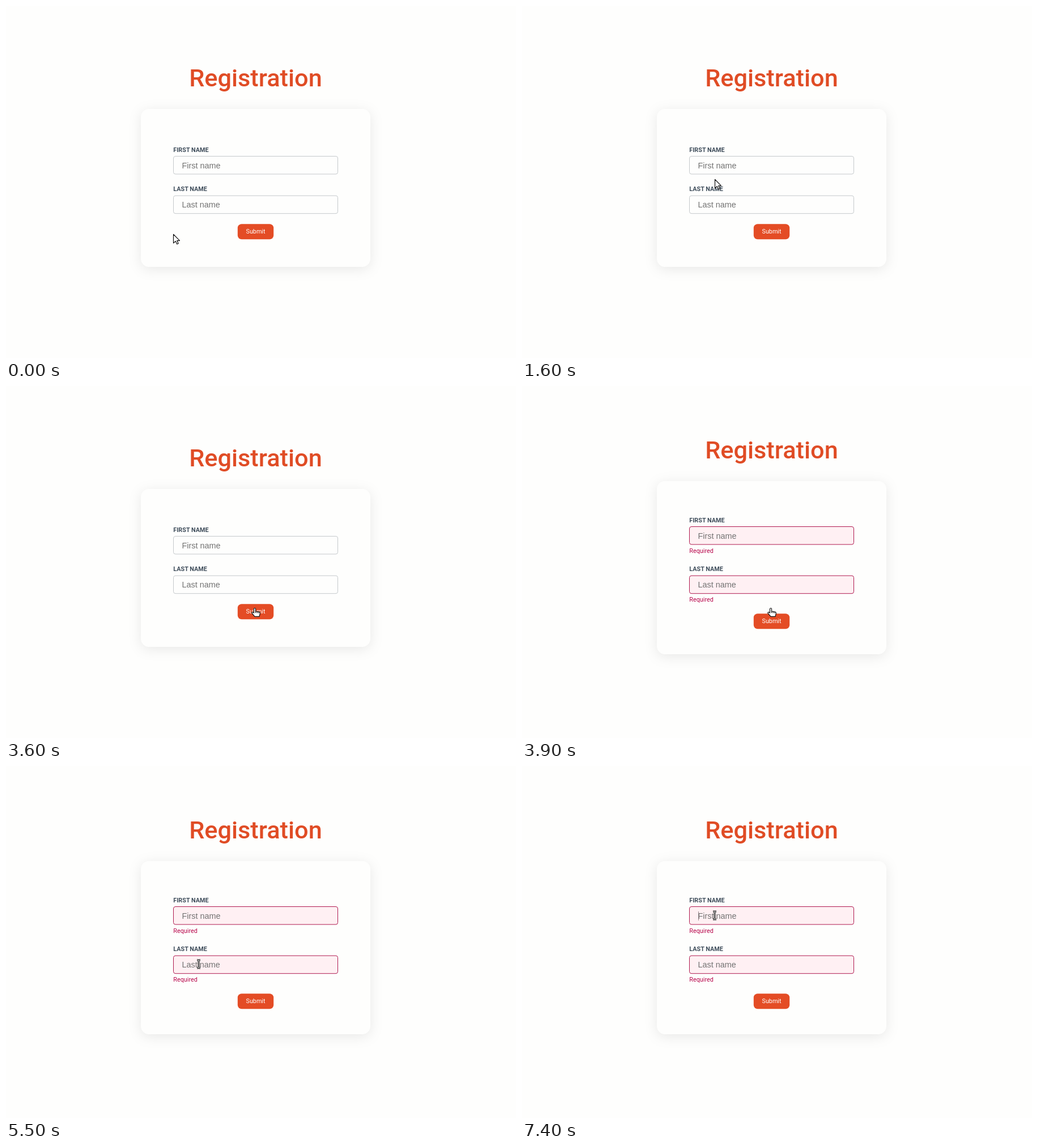
Animation of 900 by 622 pixels, one loop 8000 ms. Source, as an HTML page:

```html
<!DOCTYPE html>
<html lang="en">
<head>
<meta charset="utf-8">
<title>Registration form</title>
<style>
html, body { margin: 0; width: 100%; height: 100%; overflow: hidden; background: #fefefd; }
svg { display: block; }
text { font: 10.8px Roboto, sans-serif; }
.title { font-size: 43.2px; font-weight: 500; fill: #e04c25; text-anchor: middle; }
.card { fill: #fefefd; filter: drop-shadow(0 4px 11px rgba(0, 0, 0, .085)); }
.label { font-weight: 700; fill: #3f4d5b; }
.box { fill: #fefefd; stroke: #c5c9cc; }
.hint { font: 14.4px "Liberation Sans", Arial, sans-serif; fill: #727272; }
.required { fill: #b8054a; visibility: hidden; }
.button { fill: #e44c25; }
.caption { fill: #fff; text-anchor: middle; }
.error .box { fill: #fff0f3; stroke: #b0194f; }
.error .required { visibility: visible; }
.error .title { transform: translateY(-14px); }
.error #first { transform: translateY(-17px); }
.error #submit { transform: translateY(17px); }
#caret { fill: #99898d; }
#cursor path { stroke: #111; stroke-width: 1.2; fill: #fff; stroke-linejoin: round; }
#cursor #beam path { fill: none; stroke: inherit; stroke-width: inherit; }
#beam { stroke: #111; stroke-width: 3; }
#beam use { stroke: #ddd; stroke-width: 1; }
</style>
</head>
<body>
<svg id="stage" width="900" height="622">
  <rect id="card" class="card" x="238" width="405" rx="14.4"/>
  <text class="title" x="440.5" y="142">Registration</text>
  <g id="first"></g>
  <g id="last"></g>
  <rect id="caret" x="311" y="257" width="1" height="16"/>
  <g id="submit">
    <rect class="button" x="408.8" y="385.2" width="63.4" height="27" rx="7"/>
    <text class="caption" x="440.5" y="402">Submit</text>
  </g>
  <g id="cursor">
    <path id="arrow" d="M.5 .5V16L4.2 12.6 6.7 17.8 9.2 16.7 6.8 11.6H11.5Z"/>
    <g id="hand">
      <path d="M-1.5 8V1Q-1.5-.5 0-.5T1.5 1V5L7.5 6Q9.7 6.5 9.3 9L8 14.4H0L-5 8.5Q-5.5 6.2-3.5 6.6Z"/>
      <path d="M1.5 5V8M4.2 5.6V8.3M6.8 6V8.6"/>
    </g>
    <g id="beam">
      <path id="stem" d="M-3-7H-1L0-6 1-7H3M0-6V6M-3 7H-1L0 6 1 7H3"/>
      <use href="#stem"/>
    </g>
  </g>
</svg>
<script>
const LOOP = 8000, STEP = 100, FAILED = 3900, CLICKED = 7400;

// Where the pointer turns or rests: time, x, y
const stops = [
  [300, 295, 403], [1200, 344, 308], [1600, 340, 306],
  [2200, 314, 370], [2400, 353, 377], [3000, 353, 377],
  [3600, 439, 393], [4000, 439, 393], [4300, 430, 400],
  [4600, 301, 309], [5200, 314, 302], [5600, 345, 359],
  [6400, 305, 391], [6800, 329, 392], [7400, 340, 264]
];

const $ = id => document.getElementById(id);
const show = (id, on) => $(id).style.display = on ? "" : "none";

function addField(id, top) {
  const name = id + " name";
  $(id).innerHTML = `
    <text class="label" x="295.3" y="${top - 8}">${name.toUpperCase()}</text>
    <rect class="box" x="295.5" y="${top}" width="290" height="31.5" rx="3.5"/>
    <text class="hint" x="310.5" y="${top + 21}">${name[0].toUpperCase() + name.slice(1)}</text>
    <text class="required" x="295.3" y="${top + 46}">Required</text>`;
}

function pointerAt(t) {
  const next = stops.findIndex(stop => stop[0] > t);
  if (next < 1) return stops.at(next);
  const a = stops[next - 1], b = stops[next];
  const k = (t - a[0]) / (b[0] - a[0]);
  const eased = k * k * (3 - 2 * k);
  return a.map((v, i) => Math.round(v + (b[i] - v) * eased));
}

function cursorShape(x, y, shift) {
  const inside = (left, top, right, bottom) => x >= left && x < right && y >= top && y < bottom;
  if (inside(409, 385 + shift, 472, 412 + shift)) return "hand";
  if (inside(295, 265 - shift, 586, 298 - shift) || inside(295, 335, 586, 360)) return "beam";
  return "arrow";
}

function draw(now) {
  const t = Math.floor(now % LOOP / STEP) * STEP;
  const failed = t >= FAILED;
  $("stage").classList.toggle("error", failed);
  $("card").setAttribute("y", failed ? 168 : 182);
  $("card").setAttribute("height", failed ? 306 : 279);
  show("caret", t >= CLICKED);

  const [, x, y] = pointerAt(t);
  // The pointer reacts to the moved layout only once it moves itself
  const shape = cursorShape(x, y, t > 4000 ? 17 : 0);
  $("cursor").setAttribute("transform", `translate(${x} ${y})`);
  for (const id of ["arrow", "hand", "beam"]) show(id, id === shape);
}

addField("first", 265.5);
addField("last", 335.2);

let start;
function tick(now) {
  start ??= now;
  draw(now - start);
  requestAnimationFrame(tick);
}
draw(0);
requestAnimationFrame(tick);
</script>
</body>
</html>
```
